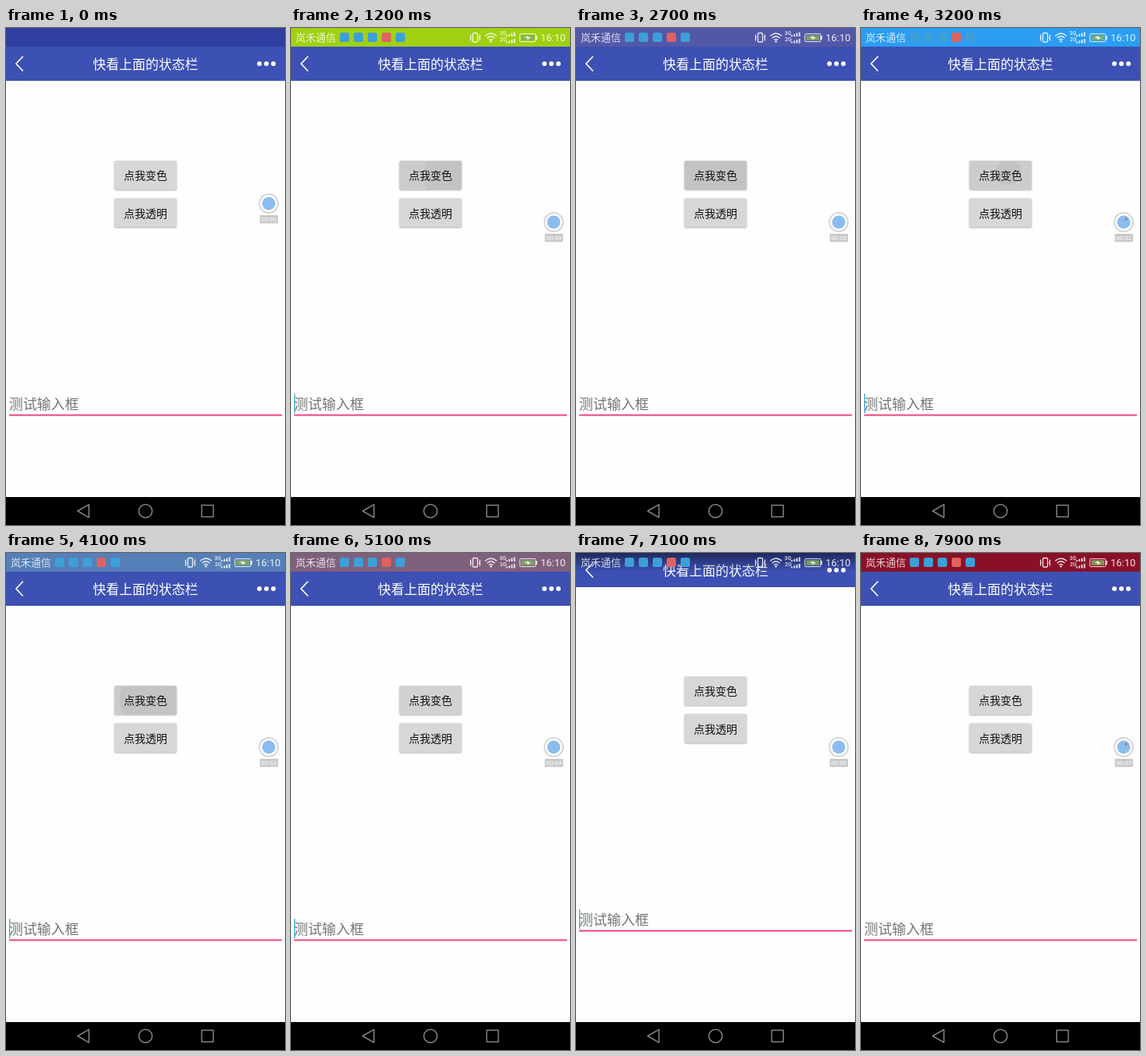
Animation, 360 px wide and 640 px high, one loop 8 s. Source, as an HTML page:

```html
<!DOCTYPE html>
<html lang="zh-CN">
<head>
<meta charset="utf-8">
<title>状态栏</title>
<style>
  html, body { margin: 0; width: 100%; height: 100%; overflow: hidden; background: #fefefe; }
  svg { display: block; width: 360px; height: 640px; }
  text { font-family: "Noto Sans CJK SC", "Noto Sans CJK", "Noto Sans", sans-serif; }
  .num { font-family: Roboto, Inter, sans-serif; }
  .line { fill: none; stroke-linejoin: round; }
</style>
</head>
<body>
<svg viewBox="0 0 360 640">
  <defs>
    <linearGradient id="shade" x1="0" y1="0" x2="0" y2="1">
      <stop offset="0" stop-color="#000" stop-opacity=".48"/>
      <stop offset="1" stop-color="#000" stop-opacity="0"/>
    </linearGradient>
    <filter id="soft" x="-10%" y="-20%" width="120%" height="140%">
      <feGaussianBlur stdDeviation="1"/>
    </filter>
    <clipPath id="buttonClip"><rect x="140" y="171" width="80" height="37" rx="1.5"/></clipPath>
  </defs>
  <rect width="360" height="640" fill="#fefefe"/>

  <g id="content">
    <g id="buttons"></g>
    <text x="4" y="491" font-size="18" fill="#757575">测试输入框</text>
    <rect x="4" y="497.5" width="352" height="2" fill="#f0437f"/>
    <rect id="cursor" x="4" y="471" width="1.3" height="25" fill="#35a2d4"/>
  </g>

  <rect id="statusBar" width="360" height="24"/>
  <g id="toolbar">
    <rect y="24" width="360" height="44" fill="#3d50b3"/>
    <path class="line" d="M22 36.5L13 46L22 55.5" stroke="#fff" stroke-width="1.8"/>
    <text x="180" y="53" font-size="17" fill="#fff" text-anchor="middle">快看上面的状态栏</text>
    <g fill="#fff">
      <circle cx="327" cy="46" r="3"/><circle cx="336" cy="46" r="3"/><circle cx="345" cy="46" r="3"/>
    </g>
  </g>
  <rect id="topShade" width="360" height="24" fill="url(#shade)"/>

  <g id="status">
    <text x="6" y="17" font-size="13" fill="#fff" opacity=".8">岚禾通信</text>
    <g id="apps"></g>
    <g class="line" stroke="#fff" stroke-width="1.3" opacity=".88">
      <rect x="234.7" y="6.5" width="6" height="11.5" rx="1"/>
      <path d="M231.7 8.5v3l.8 1l-.8 1v3M243.7 8.5v3l-.8 1l.8 1v3"/>
      <path d="M250.5 10.3Q258 3.8 265.5 10.3M253 13Q258 8.5 263 13M255.4 15.5Q258 13.2 260.6 15.5"/>
    </g>
    <circle cx="258" cy="17.2" r="1.3" fill="#fff" opacity=".88"/>
    <g id="signal" fill="#fff" opacity=".85">
      <text class="num" x="269" y="9.3" font-size="7" font-weight="500">3G</text>
      <text class="num" x="269.5" y="17.3" font-size="7" font-weight="500">2G</text>
    </g>
    <rect x="297" y="9" width="17" height="7" fill="#83b060" opacity=".8"/>
    <rect class="line" x="295.3" y="7.4" width="20.4" height="10.2" rx="1.2" stroke="#fff" opacity=".88"/>
    <rect x="316" y="10" width="1.6" height="5" fill="#fff" opacity=".88"/>
    <path d="M301 12.2L306.3 10.2L306.5 12L310 12.6L305 15L304.8 13Z" fill="#fff" opacity=".9"/>
    <text class="num" x="322" y="17" font-size="13" fill="#fff" opacity=".88">16:10</text>
  </g>

  <g id="recorder">
    <circle cx="339" cy="250" r="13" fill="#d5d5d5"/>
    <circle cx="339" cy="250" r="11" fill="#fff"/>
    <circle cx="339" cy="250" r="8.5" fill="#8abdee"/>
    <circle id="blip" cx="342" cy="246.3" r="1.7" fill="#a88089"/>
    <rect x="327.5" y="265" width="23.5" height="10.5" rx="1" fill="#c9c9c9"/>
    <text id="timer" class="num" x="339.2" y="273.2" font-size="8" fill="#fff" text-anchor="middle"></text>
  </g>

  <rect y="604" width="360" height="36"/>
  <g class="line" stroke="#858585" stroke-width="1.5">
    <path d="M92.5 622L107 613.7V630.3Z"/>
    <circle cx="180" cy="622" r="8.6"/>
    <rect x="252.5" y="614.5" width="15" height="15"/>
  </g>
</svg>
<script>
const LOOP = 8000;
const RELEASE = 80;
const CLEAR = "transparent";
// press time, button, touch point, resulting status bar colour
const taps = [
  { at: 1020, button: 0, x: 202, y: 190, color: "#a0d012" },
  { at: 1830, button: 0, x: 192, y: 188, color: "#7a165c" },
  { at: 2420, button: 0, x: 194, y: 187, color: "#5258a8" },
  { at: 3100, button: 0, x: 190, y: 186, color: "#2b9df2" },
  { at: 3870, button: 0, x: 192, y: 188, color: "#557fb6" },
  { at: 4600, button: 0, x: 192, y: 188, color: "#7f607c" },
  { at: 5320, button: 1, x: 190, y: 188, color: CLEAR },
  { at: 7280, button: 0, x: 192, y: 188, color: "#8a1028" }
];

const $ = id => document.getElementById(id);
const clamp = v => Math.max(0, Math.min(1, v));
const set = (el, attrs) => {
  for (const key in attrs) el.setAttribute(key, attrs[key]);
  return el;
};
const add = (parent, tag, attrs) =>
  parent.appendChild(set(document.createElementNS("http://www.w3.org/2000/svg", tag), attrs));

function makeButton(label, dy) {
  const group = add($("buttons"), "g", { transform: `translate(0 ${dy})` });
  const face = { x: 140, y: 171, width: 80, height: 37, rx: 1.5 };
  add(group, "rect", { ...face, y: 171.8, fill: "#000", opacity: .36, filter: "url(#soft)" });
  add(group, "rect", { ...face, fill: "#d6d7d7" });
  const press = add(group, "g", { "clip-path": "url(#buttonClip)" });
  add(press, "rect", { ...face, opacity: .05 });
  const ripple = add(press, "circle", { opacity: .045 });
  add(group, "text", { x: 180, y: 195, "font-size": 14, fill: "#111", "text-anchor": "middle" }).textContent = label;
  return { press, ripple };
}

const buttons = [makeButton("点我变色", 0), makeButton("点我透明", 48.5)];

["#3d9fd8", "#3d9fd8", "#3d9fd8", "#df625f", "#3d9fd8"].forEach((fill, i) =>
  add($("apps"), "rect", { x: 63 + 18 * i, y: 6, width: 12, height: 12, rx: 2.5, fill }));

for (const base of [11, 19.5])
  for (let i = 0; i < 4; i++) {
    const height = 2 + i * 1.2;
    add($("signal"), "rect", { x: 277.5 + 3.3 * i, y: base - height, width: 1.9, height });
  }

function drawPress(button, index, t) {
  const tap = taps.filter(p => p.button === index && p.at <= t).pop();
  const age = tap ? t - tap.at : Infinity;
  const alpha = Math.min(clamp(age / 60), clamp((560 - age) / 230));
  set(button.press, { opacity: alpha });
  if (alpha > 0) set(button.ripple, { cx: tap.x, cy: tap.y, r: 10 + 60 * (age / 300) ** 2 });
}

function render(t) {
  const last = taps.filter(p => p.at + RELEASE <= t).pop();
  const color = last ? last.color : "#303f9f";
  const clear = color === CLEAR;
  const started = t >= 300;

  set($("statusBar"), { fill: color });
  set($("topShade"), { opacity: clear ? 1 : 0 });
  set($("toolbar"), { transform: `translate(0 ${clear ? -24 : 0})` });
  set($("content"), { transform: `translate(0 ${clear ? -12 : 0})` });
  set($("status"), { opacity: started ? 1 : 0 });
  set($("recorder"), { transform: `translate(0 ${started ? 0 : -24})` });
  set($("cursor"), { opacity: (t + 950) % 1000 < 500 ? 1 : 0 });
  set($("blip"), { opacity: clamp(1.5 - Math.abs(t % 1175 - 830) / 80) });
  $("timer").textContent = "00:0" + Math.max(0, Math.floor((t - 600) / 1000));
  buttons.forEach((button, i) => drawPress(button, i, t));
}

const start = performance.now();
function frame() {
  render((performance.now() - start) % LOOP);
  requestAnimationFrame(frame);
}
frame();
</script>
</body>
</html>
```
